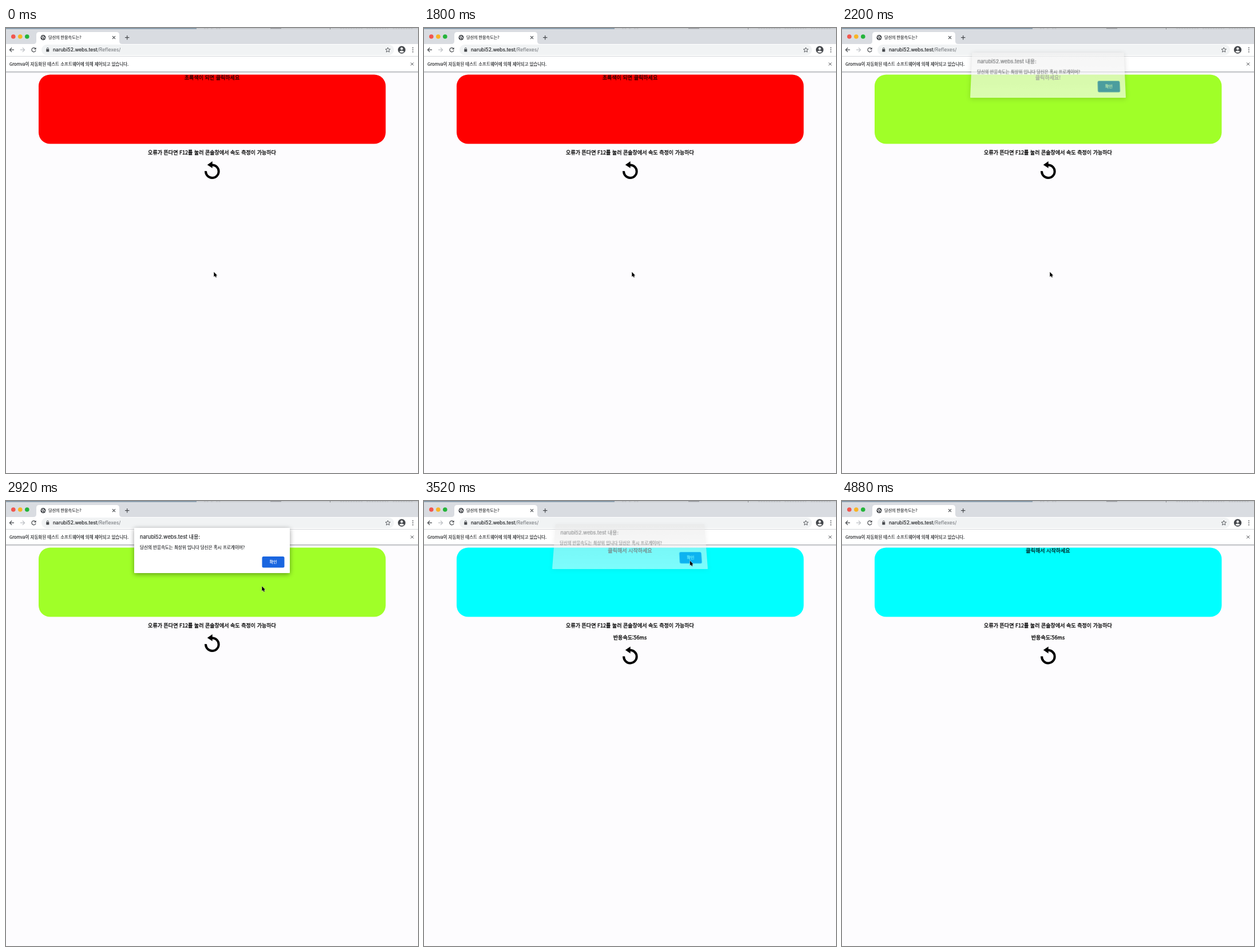
An HTML page for the animation above (5 s loop, 720 by 778 pixels).

```html
<!DOCTYPE html>
<html lang="ko">
<head>
<meta charset="utf-8">
<title>당신의 반응속도는?</title>
<style>
html, body { margin: 0; width: 100%; height: 100%; overflow: hidden; background: #fdfcfe; }
svg { position: absolute; left: 0; top: 0; }
text { font-family: "Noto Sans CJK KR", "Noto Sans CJK", sans-serif; }
.page { font-size: 9.04px; text-anchor: middle; stroke: #000; stroke-width: .3; }
.ui { fill: #26282b; stroke: #26282b; stroke-width: .18; }
.latin { font-family: Inter, "Noto Sans CJK KR", "Noto Sans CJK", sans-serif; }
.line { fill: none; stroke: #46494d; stroke-width: 1.2; }
#dialog {
  position: absolute; left: 224px; top: 47px; width: 272px; height: 79px;
  border-radius: 1px; transform-origin: 50% 100%;
}
</style>
</head>
<body>
<svg width="720" height="778">
  <!-- window frame and tabs -->
  <rect width="720" height="28" fill="#d9dce1"/>
  <rect width="333" height="2" fill="#8b9fae"/>
  <rect x="333" width="387" height="2" fill="#c9ccd0"/>
  <path d="M346 1h8m4 0h5m4 0h9M584 1h40m6 0h38m8 0h36" stroke="#b3b6ba" stroke-dasharray="3 1.5"/>
  <path d="M462 .8h19M566.5 0v2.5" stroke="#85888c"/>
  <circle cx="12.8" cy="15" r="3.8" fill="#f2564e"/>
  <circle cx="24.8" cy="15" r="3.8" fill="#f8b424"/>
  <circle cx="36.8" cy="15" r="3.8" fill="#24b43a"/>
  <path d="M48 28q5 0 5-5V12q0-5 5-5h135q5 0 5 5v11q0 5 5 5z" fill="#fff"/>
  <circle cx="65" cy="16.7" r="4.6" fill="#46494d"/>
  <path d="M61.6 15.6l2.6 1.5.4 2.8M65 13.3l-.6 1.6 2.2 1 .4 1.7 1.6.3" fill="none" stroke="#fff" stroke-width="1.1"/>
  <text class="ui" x="74" y="19.4" font-size="7.1">당신의 반응속도는?</text>
  <path class="line" d="M186 14.2l5 5m0-5l-5 5M208 16.7h7.4m-3.7-3.7v7.4"/>

  <!-- toolbar -->
  <rect y="28" width="720" height="49" fill="#fff"/>
  <rect x="62" y="29" width="616" height="18.5" rx="9.2" fill="#f1f3f4"/>
  <path class="line" d="M14 38.2H6.5m3.6-3.7l-3.7 3.7 3.7 3.7"/>
  <path class="line" style="stroke:#bcbfc3" d="M25 38.2h7.5m-3.6-3.7l3.7 3.7-3.7 3.7"/>
  <path class="line" d="M51.6 36.3a3.6 3.6 0 1 0 .4 2.9"/>
  <path d="M52.6 34v3.6H49z" fill="#46494d"/>
  <rect x="70.3" y="37" width="5" height="4.5" rx=".6" fill="#46494d"/>
  <path class="line" style="stroke-width:.9" d="M71.4 37v-1.1a1.4 1.4 0 0 1 2.8 0V37"/>
  <text class="ui latin" x="82" y="41.2" font-size="8.6">narubi52.webs.test<tspan fill="#6b6f74" stroke="none">/Reflexes/</tspan></text>
  <path class="line" style="stroke-width:.9" d="M667.3 34l1.2 2.8 3 .3-2.3 2 .7 3-2.6-1.6-2.6 1.6.7-3-2.3-2 3-.3z"/>
  <circle cx="691.5" cy="38.2" r="6.6" fill="#46494d"/>
  <circle cx="691.5" cy="36.2" r="2.1" fill="#fff"/>
  <path d="M687.3 41.6q4.2-4 8.4 0-4.2 3-8.4 0z" fill="#fff"/>
  <path d="M711 34.7v0m0 3.5v0m0 3.5v0" stroke="#46494d" stroke-width="1.8" stroke-linecap="round"/>

  <!-- notice bar -->
  <path d="M0 49.5h720" stroke="#d5d7da"/>
  <text class="ui" x="6" y="66" font-size="7.52">Gromva이 자동화된 테스트 소프트웨어에 의해 제어되고 있습니다.</text>
  <path class="line" style="stroke-width:1" d="M707.2 60.5l5 5m0-5l-5 5"/>
  <path d="M0 76.8h720" stroke="#acafb3" stroke-width="1.6"/>
  <path d="M0 78.1h720" stroke="#e4e5e8"/>

  <!-- page -->
  <rect id="pad" x="57" y="81.5" width="606.5" height="121" rx="20"/>
  <text id="prompt" class="page" x="360" y="89.6" opacity=".85"></text>
  <text class="page" x="360" y="220.5">오류가 뜬다면 F12를 눌러 콘솔창에서 속도 측정이 가능하다</text>
  <text id="score" class="page" x="360" y="241.8">반응속도:56ms</text>
  <g id="replay">
    <path d="M360 239.5a11.3 11.3 0 1 1-10.9 10.7" fill="none" stroke="#000" stroke-width="4"/>
    <path d="M351.8 239.3l8.9-6.2v12z"/>
  </g>
</svg>

<div id="dialog">
  <svg width="272" height="79">
    <text class="ui latin" x="10" y="19.4" font-size="9.2">narubi52.webs.test 내용:</text>
    <text class="ui" x="10" y="37" font-size="7.57">당신의 반응속도는 최상위 입니다 당신은 혹시 프로게이머?</text>
    <rect x="223.5" y="50" width="39" height="19.5" rx="2.5" fill="#1a66e0"/>
    <text x="243" y="62.4" font-size="7.1" fill="#fff" stroke="#fff" stroke-width=".18" text-anchor="middle">확인</text>
  </svg>
</div>

<svg width="720" height="778">
  <path id="cursor" d="M0 0V8.4L1.9 6.7 3.2 9.6 4.7 9 3.5 6.2H5.9z" stroke="#fff" stroke-width=".8" paint-order="stroke"/>
</svg>

<script>
const LOOP = 5000, STEP = 40;
const el = id => document.getElementById(id);
const show = (node, on) => node.style.visibility = on ? 'visible' : 'hidden';
const progress = (t, from, to) => Math.min(1, Math.max(0, (t - from) / (to - from)));
const mix = (a, b, p) => a + (b - a) * p;
const gray = v => `rgb(${v}, ${v}, ${v})`;

const states = [
  { at: 0, color: '#ff0000', label: '초록색이 되면 클릭하세요' },
  { at: 2040, color: '#a0ff28', label: '클릭하세요!' },
  { at: 3440, color: '#00ffff', label: '클릭해서 시작하세요', done: true }
];

function drawPage(t) {
  const state = states.filter(s => s.at <= t).pop();
  el('pad').setAttribute('fill', state.color);
  el('prompt').textContent = state.label;
  show(el('score'), state.done);
  el('replay').setAttribute('transform', `translate(0 ${state.done ? 21.3 : 0})`);
}

// The alert tilts back at its top edge while it fades in or out.
function drawDialog(t) {
  const opening = 1 - (1 - progress(t, 2120, 2320)) ** 2;
  const closing = progress(t, 3440, 3600);
  const alpha = opening * (1 - closing);
  const lift = 1.6 * (1 - opening) + 2 * closing;
  const tilt = 0.046 * lift;
  const shade = Math.min(1, lift);
  const style = el('dialog').style;
  show(el('dialog'), alpha > 0);
  style.opacity = alpha;
  style.background = `linear-gradient(${gray(mix(255, 228, shade))}, ${gray(mix(255, 250, shade))})`;
  style.boxShadow = `0 2px 9px rgba(0, 0, 0, ${mix(0.4, 0.1, shade)})`;
  style.transform = `matrix3d(1,0,0,0, 0,${1 + tilt},0,${-tilt / 79}, 0,0,1,0, 0,${-7 * lift},0,1)`;
}

function drawCursor(t) {
  const rise = progress(t, 2600, 3080);
  const nudge = progress(t, 3520, 3760);
  const leave = progress(t, 3800, 4200) ** 1.5;
  const x = mix(mix(363.3, 464.8, 1 - (1 - rise) ** 1.6), 704, leave);
  const y = mix(mix(426.5, 104.5, 1 - (1 - rise) ** 1.8) + 3 * nudge, 164, leave);
  el('cursor').setAttribute('transform', `translate(${x} ${y})`);
  show(el('cursor'), t < 4240);
}

const start = performance.now();
function frame() {
  const t = Math.floor((performance.now() - start) % LOOP / STEP) * STEP;
  drawPage(t);
  drawDialog(t);
  drawCursor(t);
  requestAnimationFrame(frame);
}
frame();
</script>
</body>
</html>
```
